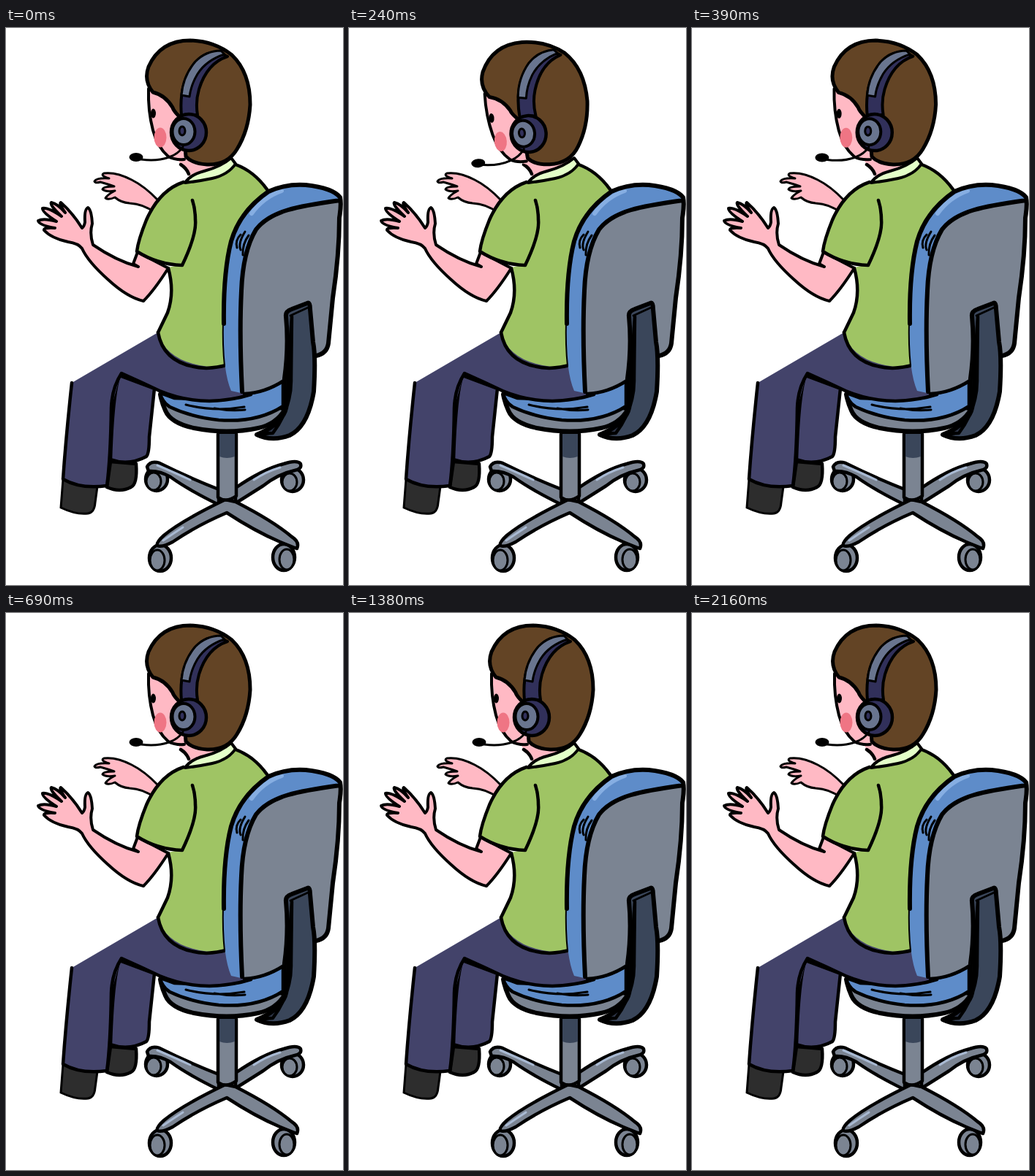
Write an HTML page that moves like this. It is 461 px wide and 763 px high and loops after 2.19 s.

```html
<!DOCTYPE html>
<html lang="en">
<head>
<meta charset="utf-8">
<title>Operator on an office chair</title>
<style>
html, body { margin: 0; width: 100%; height: 100%; overflow: hidden; background: #fff; }
svg { display: block; width: 461px; height: 763px; }
svg { stroke: #000; stroke-width: 4.5; stroke-linecap: round; stroke-linejoin: round; fill: none; }
.flat { stroke: none; }
.thin { stroke-width: 3; }
.bold { stroke-width: 6; }
.skin { fill: #ffb9c4; }
.shirt { fill: #9fc464; }
.jeans { fill: #43436a; }
.shoe { fill: #2d2d2d; }
.blue { fill: #5e8cc9; }
.grey { fill: #7b8492; }
.dark { fill: #3a465a; }
.navy { fill: #31305a; }
.steel { fill: #69758f; }
.hair { fill: #634425; }
.shine { stroke: #a9bad3; stroke-width: 3; }
</style>
</head>
<body>
<svg viewBox="0 0 461 763">
  <!-- chair base -->
  <g class="grey">
    <g id="casters"></g>
    <path d="M193 601Q198 592 210 596Q248 615 291 632L291 653Q250 633 225 615Q210 606 195 607Z"/>
    <path d="M314 630Q350 605 380 597Q398 591 403 597Q405 604 395 606Q372 611 352 627L314 651Z"/>
    <path d="M300 646Q240 675 216 695Q205 705 207 709Q213 712 228 704Q260 682 302 664Q340 689 375 704Q392 711 398 713Q402 704 391 697Q365 675 314 649Z"/>
    <path d="M290 556L290 643Q302 651 315 641L315 556Z"/>
  </g>
  <path class="shine" d="M207 599Q235 611 252 619M375 602Q355 608 339 619M215 702Q228 693 242 684"/>
  <path class="dark flat" d="M292 556H313V587Q302 591 292 587Z"/>

  <!-- legs -->
  <path class="shoe" d="M143 594L138 629Q156 637 171 629Q180 625 178 597Z"/>
  <path class="shoe thin" d="M78 618L75 657Q96 667 112 665Q121 664 122 650L125 628Z"/>
  <path class="jeans" d="M155 476Q146 500 143 591Q168 600 192 587Q196 583 196 560L203 494Z"/>
  <path class="grey bold" d="M211 502Q213 513 218 524Q225 541 257 548Q303 557 345 548Q369 543 382 522L340 510Z"/>
  <path class="blue" d="M211 500Q213 512 224 519Q253 533 291 537Q344 541 379 518L379 484Q330 512 230 507Z"/>
  <path class="thin" d="M246 516Q285 526 326 519M285 521Q306 525 327 523"/>
  <path class="jeans flat" d="M208 417L90 486L78 618Q102 632 138 627Q144 580 144 520L157 474Q185 487 210 498Q270 523 331 503L300 455Z"/>
  <path d="M90 486Q82 560 78 618Q102 632 138 627Q143 590 144 520Q145 493 158 473Q185 485 210 497Q270 522 335 502M208 417L210 421"/>

  <!-- far arm -->
  <path class="skin thin" d="M208 236Q190 217 172 208Q151 197 134 199Q128 202 141 206Q124 205 121 210Q122 213 129 211Q140 214 148 217Q133 217 132 221Q137 225 149 223Q139 228 136 233Q140 236 149 232Q157 239 169 240Q188 241 204 253Z"/>

  <!-- near arm -->
  <path class="skin" stroke-width="4" d="M180 307L174 323L181 327Q151 319 119 297Q114 281 118 268Q117 249 112 246Q107 248 108 266Q107 272 104 274Q91 253 75 239Q72 240 81 253Q71 241 62 239Q59 242 76 258Q57 245 50 247Q49 252 69 265Q51 260 44 264Q45 270 67 274Q51 273 52 277Q62 288 85 293Q99 295 104 302Q112 320 140 345Q166 369 188 374Q203 359 222 329Z"/>

  <!-- neck and shirt -->
  <path class="skin flat" d="M230 172L239 187L250 200L252 210L308 183L290 165Z"/>
  <path d="M239 187Q247 192 250 200"/>
  <path class="shirt flat" d="M245 211Q210 222 190 270L180 306Q206 325 241 324L222 328Q232 365 219 395L208 418Q222 465 300 465L300 330Q312 260 357 222Q336 197 314 187Z"/>
  <path d="M243 211Q210 222 192 263Q181 290 179 306Q207 324 241 325Q261 283 259 263Q259 248 255 236M222 329Q231 362 221 390L208 417Q216 463 274 466Q290 465 301 462M314 187Q339 196 357 221"/>
  <path fill="#e4ffc9" stroke-width="4" d="M245 212Q252 201 271 196Q294 190 308 178L314 186Q304 201 282 206Q263 210 245 212Z"/>

  <!-- chair back -->
  <path class="blue flat" d="M308 497Q296 470 297 400Q298 300 320 260Q349 216 405 213Q455 219 458 236L330 320L326 501Z"/>
  <path stroke="#86aee2" stroke-width="6" d="M336 254Q352 232 377 223"/>
  <path class="grey flat" d="M323 500Q318 425 322 360Q324 306 342 276C362 250 400 244 457 236Q458 300 448 370L442 438Q438 448 424 450L380 482Q352 500 323 500Z"/>
  <path class="bold" d="M298 405Q297 335 308 292Q320 251 359 224Q383 213 410 215Q447 219 457 232Q459 242 456 260Q456 310 447 370L441 432Q439 446 424 449M323 498Q319 420 322 360Q324 306 342 276C362 250 400 244 457 236"/>
  <path d="M326 501Q354 500 380 483"/>
  <path stroke-width="2" d="M297 400Q296 435 299 463"/>
  <path class="thin" d="M321 283Q313 291 316 301M327 279Q317 295 321 304M332 284Q323 296 324 311"/>

  <!-- bracket -->
  <path class="dark bold" d="M383 395Q382 388 391 385L412 377Q416 375 416 385L420 430Q424 450 421 498Q413 546 388 558Q364 567 343 557Q373 545 380 525L381 480Q387 436 383 395Z"/>
  <path fill="#2c3446" d="M391 395L390 480Q391 520 365 555Q356 555 345 558Q380 541 384 520L387 455Z"/>
  <path class="thin" d="M389 394L413 383"/>

  <!-- head -->
  <g id="head">
    <path class="skin flat" d="M196 84L199 130Q207 163 223 176L252 188L262 110L230 75Z"/>
    <path stroke-width="4" d="M195 83Q194 113 201 140Q207 163 222 176Q231 181 244 180"/>
    <path class="hair" stroke-width="5" d="M201 88Q188 72 195 53Q211 17 252 17Q285 18 309 37Q334 61 334 105Q332 140 316 166Q303 188 275 187Q255 186 246 176L242 126Q229 114 228 109Q218 92 201 88Z"/>
    <path class="navy" stroke-width="4" d="M240 119Q236 77 258 48Q278 25 303 39Q275 48 264 84Q259 101 262 119Z"/>
    <path class="steel thin" d="M240 92Q242 66 259 46Q274 31 294 31L299 36Q274 44 262 63Q253 78 251 94Z"/>
    <ellipse class="navy" cx="250" cy="143" rx="24" ry="25"/>
    <ellipse class="steel" cx="243" cy="142" rx="15.500" ry="18" stroke-width="4"/>
    <ellipse class="navy thin" cx="241" cy="141" rx="4" ry="6"/>
    <ellipse fill="#ef7584" class="flat" cx="211" cy="150" rx="8.500" ry="13.500"/>
    <ellipse fill="#000" class="flat" cx="201.500" cy="117" rx="3.500" ry="6.500"/>
    <path class="thin" d="M185 180Q206 183 223 177Q235 173 242 163"/>
    <ellipse fill="#000" class="flat" cx="178" cy="177" rx="9.500" ry="6"/>
  </g>
</svg>
<script>
const LOOP = 2190, STEP = 30, NOD = 420, TILT = -5.2;
const head = document.getElementById('head');

// A caster is a wheel with a smaller disc on its outer side.
const caster = (x, y, ry, side) => `
  <ellipse cx="${x}" cy="${y}" rx="15" ry="${ry}"/>
  <ellipse class="thin" cx="${x + 4 * side}" cy="${y + 3}" rx="10" ry="${ry - 4}"/>`;
document.getElementById('casters').innerHTML =
  caster(206, 618, 16, -1) + caster(392, 619, 16, -1) +
  caster(211, 726, 18, -1) + caster(380, 725, 18, 1);

function draw(now) {
  const t = Math.floor(now % LOOP / STEP) * STEP;
  const lean = t < NOD ? Math.sin(Math.PI * t / NOD) ** 2 : 0;
  head.setAttribute('transform', `rotate(${TILT * lean} 272 195)`);
  requestAnimationFrame(draw);
}
draw(performance.now());
</script>
</body>
</html>
```
